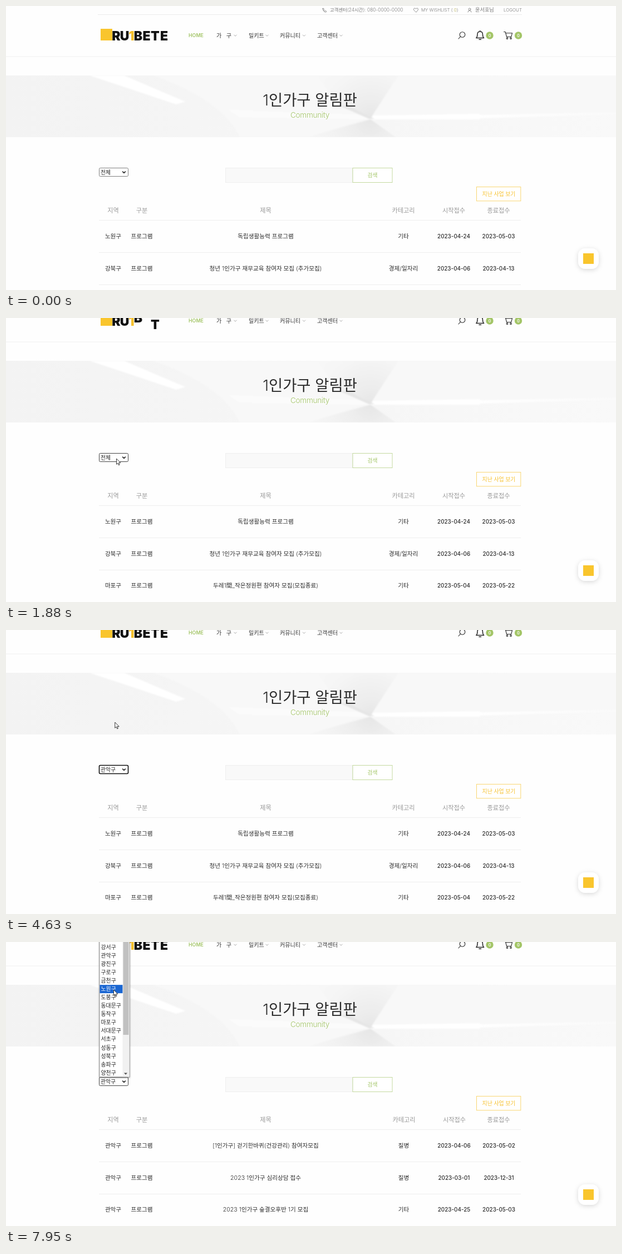
An HTML page that plays this animation: 1096x511 px, repeating every 8000 ms.

```html
<!DOCTYPE html>
<html lang="ko">
<head>
<meta charset="utf-8">
<title>알림판</title>
<style>
  html, body { margin: 0; width: 100%; height: 100%; overflow: hidden; background: #fefefe; }
  svg { display: block; width: 100%; height: 100%; }
  text { font-family: Inter, "Noto Sans CJK KR", "Noto Sans CJK", sans-serif; font-weight: 350; white-space: pre; }
  .light { font-weight: 300; }
  .medium { font-weight: 500; }
  .bold { font-weight: 600; }
  .heavy { font-weight: 900; }
  .icon { fill: none; stroke: #2a2a2a; stroke-width: 1.1; stroke-linecap: round; stroke-linejoin: round; }
  .thin { stroke: #777; stroke-width: .8; }
  .thick { stroke-width: 1.5; }
</style>
</head>
<body>
<svg id="stage" viewBox="0 0 1096 511">
  <defs>
    <linearGradient id="wall">
      <stop offset="0" stop-color="#f3f3f3"/><stop offset=".3" stop-color="#f5f5f5"/>
      <stop offset=".6" stop-color="#f6f6f6"/><stop offset="1" stop-color="#f9f9f9"/>
    </linearGradient>
    <linearGradient id="beam">
      <stop offset="0" stop-color="#fff"/><stop offset="1" stop-color="#fff" stop-opacity=".2"/>
    </linearGradient>
    <radialGradient id="shade" gradientUnits="userSpaceOnUse" cx="655" cy="202" r="130">
      <stop offset="0" stop-color="#e6e6e6"/><stop offset="1" stop-color="#f4f4f4" stop-opacity="0"/>
    </radialGradient>
    <filter id="blur" x="-20%" y="-20%" width="140%" height="140%"><feGaussianBlur stdDeviation="1"/></filter>
    <filter id="shadow" x="-50%" y="-50%" width="200%" height="200%">
      <feDropShadow dx="0" dy="2" stdDeviation="4" flood-opacity=".15"/>
    </filter>
    <filter id="listShadow" x="-30%" y="-5%" width="160%" height="110%">
      <feDropShadow dx="0" dy="1" stdDeviation="1.5" flood-opacity=".4"/>
    </filter>
    <clipPath id="bannerClip"><rect y="125" width="1096" height="111"/></clipPath>
    <clipPath id="logoClip"><rect x="165" y="30" width="135" height="38"/></clipPath>
  </defs>

  <g id="page">
    <g id="banner" clip-path="url(#bannerClip)">
      <rect y="125" width="1096" height="111" fill="url(#wall)"/>
      <g filter="url(#blur)">
        <path d="M265 125H710L655 200L545 236H420Q390 170 265 125Z" fill="#f8f8f8"/>
        <path d="M705 125H1096V192L655 198Z" fill="#f8f8f8"/>
        <path d="M655 202L705 125H560L596 178ZM655 204L540 236H700Z" fill="url(#shade)"/>
        <path d="M150 125H212L322 172L306 177Z" fill="#fff"/>
        <path d="M400 187L640 196L655 204L420 200Z" fill="#fff" opacity=".5"/>
        <path d="M660 197L850 194Q858 199 850 204L655 204Z" fill="#fff"/>
        <path d="M850 196L1096 191V195L850 202Z" fill="url(#beam)"/>
        <path d="M596 178L652 203H662L620 182Z" fill="#e6e6e6"/>
      </g>
    </g>
    <g id="header">
      <path class="icon thin" d="M569 4.5q1-1.3 2 .3l.6 1.4-.9.9q.8 1.6 2.2 2.2l1-.9 1.5.8q1 1.2-.6 2Q570 11 569 4.5Z"/>
      <path class="icon thin" d="M736.500 11l-3.600-3.600q-1.200-2.200.5-3.300 1.900-.7 3.100 1 1.200-1.700 3.100-1 1.700 1.100.5 3.300Z"/>
      <circle class="icon thin" cx="833" cy="5.8" r="1.9"/><path class="icon thin" d="M830 11q.2-3 3-3t3 3"/>
      <circle class="icon" cx="820" cy="51.5" r="4.8"/><path class="icon" d="M816.5 55l-3.5 4"/>
      <path class="icon thick" d="M844.8 57.5q2.200-2 2.200-6.500 0-5 4.700-5t4.700 5q0 4.500 2.200 6.500ZM850 60.300h3.500M851.700 44.500v1"/>
      <path class="icon" d="M894.5 46.500h2.600l2.500 9h8l2-6.800h-12"/>
      <circle class="icon" cx="900.5" cy="58.2" r="1.3"/><circle class="icon" cx="907" cy="58.2" r="1.3"/>
    </g>
    <g id="logo" clip-path="url(#logoClip)"><rect id="mark" x="170" y="41" width="21" height="21" fill="#f9c52d"/></g>
    <g id="form"></g>
    <g id="table"></g>
    <g id="rowsAll"></g>
    <g id="rowsPicked"></g>
  </g>

  <g id="list"></g>
  <rect x="1028" y="436" width="37" height="37" rx="13" fill="#fff" filter="url(#shadow)"/>
  <rect x="1037" y="445" width="19" height="19" fill="#f9c52d"/>
  <path id="cursor" d="M0 0V10.3L2.4 8.2 4 11.8 5.600 11.1 4.100 7.600H7.400Z" fill="#fff" stroke="#222" stroke-width=".9"/>
</svg>

<script>
const LOOP = 8000, LOGO_LOOP = 4990;
const GREEN = '#a3c567', YELLOW = '#f6c02c', GRAY = '#777';
const $ = id => document.getElementById(id);

function add(parent, tag, attrs, content) {
  const el = document.createElementNS('http://www.w3.org/2000/svg', tag);
  for (const k in attrs) el.setAttribute(k, attrs[k]);
  if (content) el.textContent = content;
  return (typeof parent === 'string' ? $(parent) : parent).appendChild(el);
}
const text = (parent, x, y, size, str, fill = '#333', weight = '', more = {}) =>
  add(parent, 'text', { x, y, 'font-size': size, fill, class: weight, ...more }, str);
const centered = (parent, x, y, size, str, fill, weight, more = {}) =>
  text(parent, x, y, size, str, fill, weight, { 'text-anchor': 'middle', ...more });
const box = (parent, x, y, width, height, fill, more = {}) =>
  add(parent, 'rect', { x, y, width, height, fill, ...more });
const line = (parent, x, y, width, fill) => box(parent, x, y, width, 1, fill);
const chevron = (parent, x, y, size, stroke, width) => add(parent, 'path', {
  d: `M${x - size} ${y - size / 2}l${size} ${size} ${size} ${-size}`, fill: 'none', stroke, 'stroke-width': width });

// Header
text('header', 582, 10, 8.4, '고객센터(24시간): 080-0000-0000', GRAY, 'light');
const wish = text('header', 746, 10.3, 7.9, 'MY WISHLIST ( ', GRAY, 'light');
add(wish, 'tspan', { fill: '#b0a94a' }, '0');
add(wish, 'tspan', {}, ')');
text('header', 843, 10, 9.2, '윤서호님', GRAY, 'light');
text('header', 894, 10.3, 7.9, 'LOGOUT', GRAY, 'light');
line('header', 165, 15, 762, '#ebebeb');
line('header', 0, 90.5, 1096, '#f1f1f1');
text('header', 328, 56, 8.9, 'HOME', GREEN, 'bold');
[[378, '가\u00a0\u00a0\u00a0구', 412], [436, '밀키트', 469], [492, '커뮤니티', 535.5], [559, '고객센터', 602]]
  .forEach(([x, label, arrow]) => {
    text('header', x, 56.5, 10.1, label);
    chevron('header', arrow, 53, 2.5, '#aaa', 1);
  });
[869, 920.5].forEach(cx => {
  add('header', 'circle', { cx, cy: 53, r: 6.7, fill: GREEN });
  centered('header', cx, 55.5, 7, '0', '#fff', 'bold');
});

// Logo letters: centre and start of the rise
const letters = [[198, 1380], [213, 1440], [225.5, 1500], [237.5, 1680], [252.5, 1872], [268, 1812], [284, 1930]]
  .map(([x, start], i) => ({
    start,
    el: centered('logo', x, 62, 23, 'RU1BETE'[i], i === 2 ? YELLOW : '#111', 'heavy')
  }));

// Banner text
centered('banner', 546, 178.5, 27.4, '1인가구 알림판', '#2a2a2a', 'light');
centered('banner', 546, 201, 13.6, 'Community', GREEN, '', { 'letter-spacing': -.3 });

// Search form
const select = box('form', 167.5, 291.5, 52, 15, '#fff', { rx: 2 });
const choice = text('form', 170, 302.5, 9.8, '전체', '#222');
chevron('form', 212, 299, 2.8, '#222', 1.5);
box('form', 394.5, 291.5, 228, 26, '#f9f9f9', { stroke: '#efefef' });
box('form', 623, 291.5, 71, 26, '#fff', { stroke: '#c4d9a0' });
centered('form', 658.5, 308, 9.8, '검색', GREEN, 'medium');
box('form', 845.5, 325.5, 79.3, 25.3, '#fff', { stroke: '#f9d673' });
centered('form', 885.5, 341.5, 9.9, '지난 사업 보기', YELLOW, 'medium');

// Table
const columns = [192.5, 244, 466.5, 714, 804.5, 885];
const heads = ['지역', '구분', '제목', '카테고리', '시작접수', '종료접수']
  .map((label, i) => centered('table', columns[i], 371.5, 11.2, label, '#999'));
for (let y = 385; y < 600; y += 58) line('table', 167, y, 758, '#eee');

function fillRows(group, rows, shift) {
  rows.forEach(([area, ...rest], r) => {
    [area, '프로그램', ...rest].forEach((cell, i) => {
      const isDate = i > 3;
      centered(group, columns[i] + (i > 2 ? shift : 0), 417.7 + r * 57.8, isDate ? 9.9 : 10.6, cell,
        '#2b2b2b', isDate ? 'medium' : '');
    });
  });
}
fillRows('rowsAll', [
  ['노원구', '독립생활능력 프로그램', '기타', '2023-04-24', '2023-05-03'],
  ['강북구', '청년 1인가구 재무교육 참여자 모집 (추가모집)', '경제/일자리', '2023-04-06', '2023-04-13'],
  ['마포구', '두레1間_작은정원편 참여자 모집(모집종료)', '기타', '2023-05-04', '2023-05-22']
], 0);
fillRows('rowsPicked', [
  ['관악구', '[1인가구] 걷기한바퀴(건강관리) 참여자모집', '질병', '2023-04-06', '2023-05-02'],
  ['관악구', '2023 1인가구 심리상담 접수', '질병', '2023-03-01', '2023-12-31'],
  ['관악구', '2023 1인가구 숲결오후반 1기 모집', '기타', '2023-04-25', '2023-05-03']
], .5);

// Drop-down list
const ROW = 15.07;
box('list', 168, -20, 54, 263, '#fff', { stroke: '#777', 'stroke-width': .8, filter: 'url(#listShadow)' });
box('list', 209.5, -20, 12, 262.5, '#f1f1f1');
box('list', 210.5, -20, 10, 187, '#c1c1c1');
add('list', 'path', { d: 'M212 235.5h6l-3 3.2Z', fill: '#505050' });
const highlight = box('list', 168.5, 0, 41, 15, '#1a66d2');
const items = ('강서구 관악구 광진구 구로구 금천구 노원구 도봉구 동대문구 동작구 마포구 ' +
  '서대문구 서초구 성동구 성북구 송파구 양천구').split(' ')
  .map((label, i) => text('list', 170.5, 12.7 + i * ROW, 9.9, label, '#222'));

// Motion tables: time first
const scrollKeys = [[880, 0], [1010, 14], [1150, 31.4], [1350, 43], [1600, 48]];
const markKeys = [[900, 1], [1100, .75], [1180, .75], [1380, 1]];
const cursorKeys = [
  [480, 470, 360], [850, 345, 280], [1150, 340, 271], [1300, 340, 271], [1700, 215, 248],
  [1880, 198.5, 253], [2550, 198.5, 253], [2880, 186, -16], [3490, 186, -14], [3690, 183, 20],
  [3950, 183, 20], [4400, 190, 120], [5000, 205, 240], [5550, 208, 257], [5700, 208, 257],
  [6100, 212, 255], [6450, 206, 247], [6600, 206, 246], [6850, 203, 218.5], [7340, 203, 217],
  [7930, 193.5, 86]
];
const hoverSteps = [
  [0, -1], [2620, 15], [2680, 12], [2740, 7], [3160, -1], [3560, 0], [3760, 1],
  [6650, 15], [6800, 14], [7420, 12], [7540, 10], [7660, 8], [7780, 6], [7880, 5]
];

function sample(keys, t) {
  const n = keys.findIndex(k => k[0] > t);
  if (n === 0) return keys[0].slice(1);
  if (n < 0) return keys[keys.length - 1].slice(1);
  const a = keys[n - 1], b = keys[n], u = (t - a[0]) / (b[0] - a[0]);
  return a.slice(1).map((v, i) => v + (b[i + 1] - v) * u);
}
const clamp = v => Math.max(0, Math.min(1, v));
const show = (el, on) => el.setAttribute('visibility', on ? 'visible' : 'hidden');
const outBack = u => 1 + 3.9 * (u - 1) ** 3 + 2.9 * (u - 1) ** 2;

function drawLogo(t) {
  const fade = 1 - clamp((t - 700) / 300);
  const rising = t > 1200;
  $('mark').setAttribute('opacity', sample(markKeys, t)[0]);
  letters.forEach(({ el, start }) => {
    const dy = rising ? 26 * (1 - outBack(clamp((t - start) / 400))) : 0;
    el.setAttribute('transform', `translate(0 ${dy})`);
    el.setAttribute('opacity', rising ? +(t > start) : fade);
  });
}

function draw(t) {
  $('page').setAttribute('transform', `translate(0 ${-sample(scrollKeys, t)[0]})`);
  drawLogo(t % LOGO_LOOP);

  const open = (t >= 2050 && t < 3930) || t >= 6530;
  const picked = t >= 3930, swapped = t >= 4690;
  const ring = picked && !open;
  choice.textContent = picked ? '관악구' : '전체';
  select.setAttribute('stroke', ring ? '#101010' : t > 1700 ? '#444' : '#808080');
  select.setAttribute('stroke-width', ring ? 1.6 : 1);
  show($('rowsAll'), !swapped);
  show($('rowsPicked'), swapped);
  [3, 4].forEach(i => heads[i].setAttribute('x', columns[i] + swapped));

  const hover = hoverSteps.filter(s => s[0] <= t).pop()[1];
  $('list').setAttribute('display', open ? 'inline' : 'none');
  show(highlight, hover >= 0);
  highlight.setAttribute('y', 1.8 + hover * ROW);
  items.forEach((el, i) => el.setAttribute('fill', i === hover ? '#fff' : '#222'));

  show($('cursor'), t >= 480);
  $('cursor').setAttribute('transform', `translate(${sample(cursorKeys, t)})`);
}

let begin;
function tick(now) {
  begin ??= now;
  draw((now - begin) % LOOP);
  requestAnimationFrame(tick);
}
draw(0);
requestAnimationFrame(tick);
</script>
</body>
</html>
```
